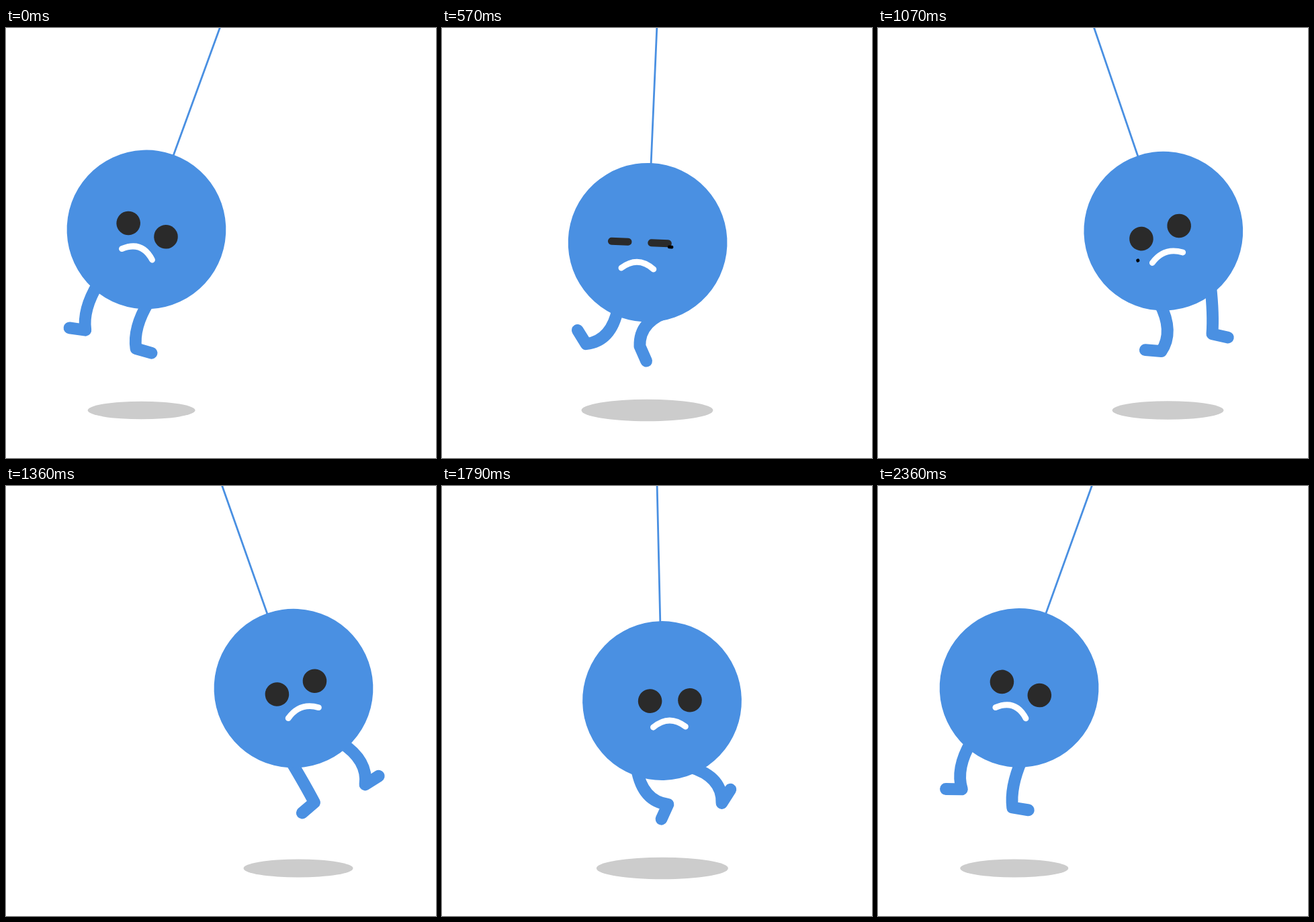
An HTML page with a canvas for the animation above (2430 ms loop, 640 by 640 pixels).

```html
<!DOCTYPE html>
<html lang="en">
<head>
<meta charset="utf-8">
<title>Sad pendulum</title>
<style>
html, body { margin: 0; height: 100%; overflow: hidden; background: #fff; }
canvas { display: block; width: 640px; height: 640px; }
</style>
</head>
<body>
<canvas id="stage" width="640" height="640"></canvas>
<script>
const ctx = document.getElementById('stage').getContext('2d');
const BLUE = '#4a90e2', DARK = '#2a2a2a';
const LOOP = 2430, FPS = 14, LAST = 33;
const PIVOT_Y = -5, ROPE = 324.6, RADIUS = 118.4, EYE = 35.6;
const RAD = Math.PI / 180;

const clamp = (v, lo, hi) => Math.min(hi, Math.max(lo, v));
const wave = t => Math.sin(2 * Math.PI * t / 2.4);

// Cubic bezier easing with handles (x1, 0) and (x2, 1)
function ease(p, x1, x2) {
  p = clamp(p, 0, 1);
  let lo = 0, hi = 1, s;
  for (let i = 0; i < 24; i++) {
    s = (lo + hi) / 2;
    const q = 1 - s;
    const x = 3 * q * q * s * x1 + 3 * q * s * s * x2 + s ** 3;
    if (x < p) lo = s; else hi = s;
  }
  return s * s * (3 - 2 * s);
}

// Degrees, positive when the body hangs to the left
function swingAngle(t) {
  return t < 1.24
    ? 20 - 40 * ease((t - 0.01) / 1.23, 0.46, 0.51)
    : -20 + 40 * ease((t - 1.24) / 1.2, 0.5, 0.42);
}

function stroke(color, width, path) {
  ctx.strokeStyle = color;
  ctx.lineWidth = width;
  ctx.beginPath();
  path();
  ctx.stroke();
}

function ellipse(color, x, y, rx, ry) {
  ctx.fillStyle = color;
  ctx.beginPath();
  ctx.ellipse(x, y, rx, ry, 0, 0, 2 * Math.PI);
  ctx.fill();
}

function pill(color, x, y, w, h, r) {
  ctx.fillStyle = color;
  ctx.beginPath();
  ctx.roundRect(x - w / 2, y - h / 2, w, h, r);
  ctx.fill();
}

// side is -1 for the left leg, 1 for the right leg
function leg(t, side) {
  const s = wave(t - 0.05);
  const hipX = 40 * side, hipY = 100;
  const dx = -46 * s, dy = 72 - 0.0085 * dx * dx;
  const len = Math.hypot(dx, dy);
  const bend = -29 * side * wave(t + 0.17 * side);
  const turn = (61 * s + 4 * side) * RAD;
  const x = hipX + dx, y = hipY + dy;
  stroke(BLUE, 17.8, () => {
    ctx.moveTo(hipX, hipY);
    ctx.quadraticCurveTo(
      hipX + 0.6 * dx + bend * dy / len,
      hipY + 0.6 * dy - bend * dx / len, x, y);
    ctx.lineTo(x + 24 * side * Math.cos(turn), y + 24 * side * Math.sin(turn));
  });
}

function tear(age, x, y, w) {
  if (age < 0 || age > 0.45) return;
  const h = Math.min(4 + 26 * age, 40 * (0.45 - age));
  pill('#000', x, y + 72 * age, w, h, Math.min(2.2, h / 2));
}

function face(t) {
  ctx.save();
  ctx.translate(-11.9 * wave(t - 0.04), 0);
  const h = Math.min(EYE, 5 + EYE * Math.abs(t - 0.6) / 0.17);
  for (const x of [-29.7, 29.7]) pill(DARK, x, 0.2, EYE, h, h / 2);
  tear(t - 0.54, 46, 3, 8.5);
  tear(t - 0.75, -45, 6, 5);
  const depth = 9.7 + 1.3 * Math.cos(2 * Math.PI * t / 2.4);
  stroke('#fff', 8.8, () => {
    ctx.moveTo(-25.8, 39.4);
    ctx.quadraticCurveTo(-1.8, 39.4 - 2 * depth, 22.2, 39.4);
  });
  ctx.restore();
}

function draw(t) {
  const angle = swingAngle(t);
  ctx.fillStyle = '#fff';
  ctx.fillRect(0, 0, 640, 640);
  const shadow = 98 - 18 * Math.abs(angle / 20) ** 3;
  ellipse('#ccc', 320 - 5.92 * angle, 569, shadow, shadow / 6);

  ctx.save();
  ctx.lineCap = ctx.lineJoin = 'round';
  ctx.translate(320, PIVOT_Y);
  ctx.rotate(angle * RAD);
  ctx.translate(0, ROPE);
  stroke(BLUE, 2.8, () => {
    ctx.moveTo(0, -ROPE - 10);
    ctx.lineTo(0, -100);
  });
  leg(t, -1);
  leg(t, 1);
  ellipse(BLUE, 0, 0, RADIUS, RADIUS);
  face(t);
  ctx.restore();
}

const start = performance.now();
function tick(now) {
  const ms = Math.max(0, now - start) % LOOP;
  // Stepped at 14 pictures a second, each start rounded to 10 ms
  draw(Math.min(LAST, Math.floor((ms + 5) * FPS / 1000)) / FPS);
  requestAnimationFrame(tick);
}
tick(start);
</script>
</body>
</html>
```
